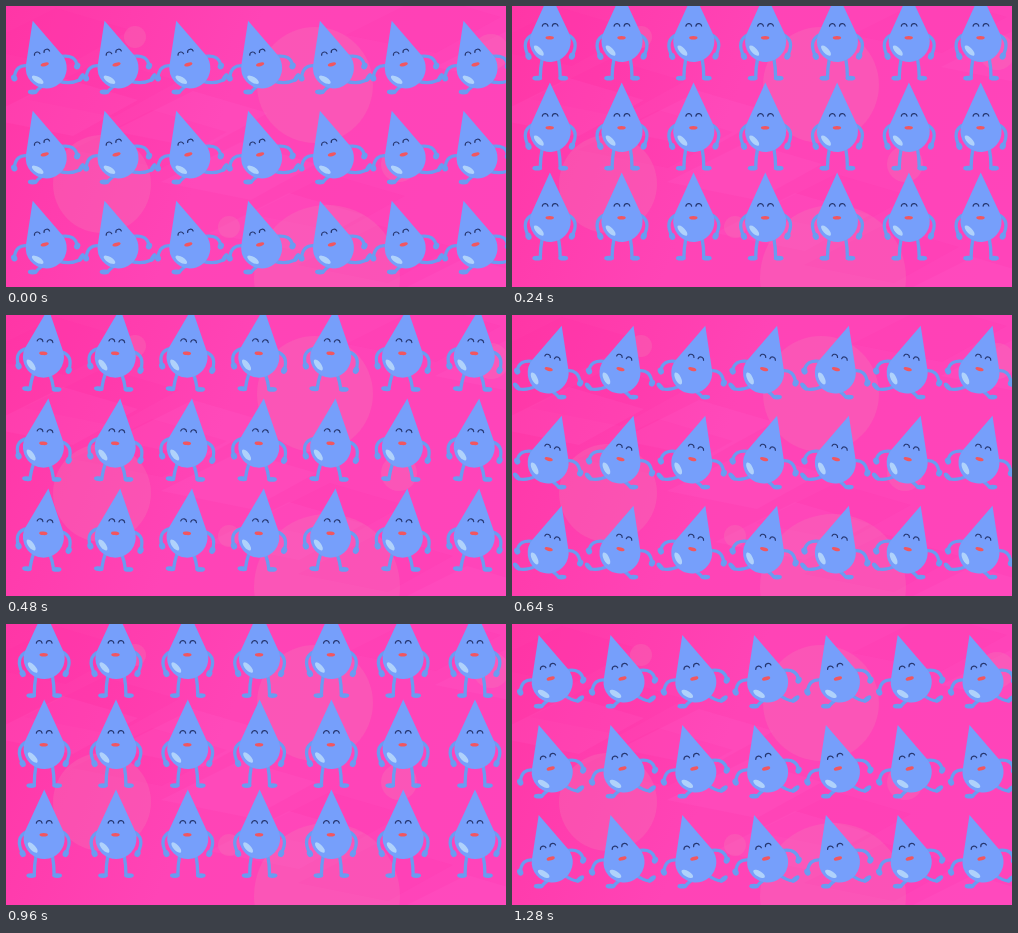
Recreate the animation shown at these times as an HTML page with a canvas. Size 500x281 px, loop 1.36 s.

```html
<!DOCTYPE html>
<html lang="en">
<head>
<meta charset="utf-8">
<title>Dancing drops</title>
<style>
  html, body { margin: 0; width: 100%; height: 100%; overflow: hidden; background: #ff41b2; }
  canvas { display: block; width: 500px; height: 281px; }
</style>
</head>
<body>
<canvas id="stage" width="500" height="281"></canvas>
<script>
const ctx = document.getElementById('stage').getContext('2d');
const LOOP = 1360, STEP = 80;
const BODY = '#769ffb', LIMB = '#6a9cf1';

const clamp = v => Math.max(0, Math.min(1, v));
const ease = v => v * v * (3 - 2 * v);

// How firmly the dancer is landed at point u (0..1) of a hop
const landed = u => ease(clamp((Math.abs(Math.cos(Math.PI * u)) - .4) / .5));

// The foot that stands at the start of a hop and kicks out at its end
function footAt(u) {
  const kick = clamp((u - .65) / .35);
  return { x: 10 + 24 * kick, y: 39 - 13 * landed(u) - 12 * kick * kick, kick };
}

// Two hops per loop: from left to right, then mirrored
function poseAt(time) {
  const hop = time / LOOP * 2, u = hop % 1;
  const dir = hop < 1 ? 1 : -1;
  const c = Math.cos(Math.PI * u);
  const start = footAt(u), end = footAt(1 - u);
  return {
    y: 32 + 26 * landed(u) + 2 * c,
    sway: -Math.sign(c) * landed(u) * dir,
    feet: dir > 0 ? [start, end] : [end, start]
  };
}

function dot(x, y, rx, ry, angle, color) {
  ctx.fillStyle = color;
  ctx.beginPath();
  ctx.ellipse(x, y, rx, ry, angle, 0, 7);
  ctx.fill();
}

function limb(x0, y0, cx, cy, x1, y1) {
  ctx.beginPath();
  ctx.moveTo(x0, y0);
  ctx.quadraticCurveTo(cx, cy, x1, y1);
  ctx.stroke();
}

// The arm on the side the drop leans away from swings up
function drawArm(side, sway, turn) {
  const raise = clamp(-sway * side), lower = clamp(sway * side);
  const x = side * (21.5 + 10 * (raise + lower));
  const y = 17 - 17 * raise - 5 * lower;
  limb(...turn(side * 17, -5), side * 30, 1 - 13 * raise - 3 * lower, x, y);
  dot(x, y, 3, 3.6, side * .4, LIMB);
}

function drawLeg(side, { x, y, kick }, turn) {
  const [hx, hy] = turn(side * 8, 18);
  const fx = side * x;
  limb(hx, hy, (hx + fx) / 2 + side, (hy + y) / 2 + kick * 4, fx, y);
  dot(fx + side * 3 * Math.cos(kick), y - 3 * Math.sin(kick), 4.8, 2.4, -side * kick, LIMB);
}

// A cone touching a circle, with the face on top
function drawBody() {
  const r = 20.5, cy = 2, tip = -47;
  const touch = Math.asin(r / (cy - tip));
  ctx.fillStyle = BODY;
  ctx.beginPath();
  ctx.moveTo(0, tip);
  ctx.arc(0, cy, r, -touch, Math.PI + touch);
  ctx.fill();
  dot(-11.5, 11, 2.8, 6.6, -.75, '#b0d2fb');
  ctx.strokeStyle = '#26366f';
  ctx.lineWidth = 1.2;
  for (const x of [-5, 5]) {
    ctx.beginPath();
    ctx.arc(x, -13, 2.9, Math.PI * 1.05, Math.PI * 1.95);
    ctx.stroke();
  }
  dot(-.5, -1.8, 4.2, 1.8, 0, '#f2565f');
}

function drawDrop(x, y, { sway, feet }) {
  const angle = sway * .28, c = Math.cos(angle), s = Math.sin(angle);
  const turn = (px, py) => [px * c - py * s, px * s + py * c];
  ctx.save();
  ctx.translate(x, y);
  ctx.strokeStyle = LIMB;
  ctx.lineWidth = 3.3;
  ctx.lineCap = 'round';
  [-1, 1].forEach((side, i) => {
    drawLeg(side, feet[i], turn);
    drawArm(side, sway, turn);
  });
  ctx.rotate(angle);
  drawBody();
  ctx.restore();
}

function drawPaper() {
  const pink = ctx.createLinearGradient(0, 0, 500, 200);
  pink.addColorStop(0, '#ff36a6');
  pink.addColorStop(.45, '#ff44b6');
  pink.addColorStop(1, '#ff44ba');
  ctx.fillStyle = pink;
  ctx.fillRect(0, 0, 500, 281);
  // soft paper creases
  for (let i = 0; i < 12; i++) {
    const x = (i * 137 + 40) % 500, y = (i * 83 + 30) % 281;
    ctx.fillStyle = i % 2 ? 'rgba(255,120,215,.1)' : 'rgba(255,30,155,.08)';
    ctx.beginPath();
    ctx.moveTo(x - 70, y + 12);
    ctx.lineTo(x + 10, y - 28);
    ctx.lineTo(x + 85, y - 6);
    ctx.lineTo(x + 20, y + 30);
    ctx.fill();
  }
  const spots = [[309, 79, 58], [96, 178, 49], [321, 272, 73], [393, 158, 18], [485, 46, 18], [223, 221, 11], [129, 31, 11]];
  for (const [x, y, r] of spots) dot(x, y, r, r, 0, 'rgba(240,130,180,.27)');
}

function frame() {
  const time = performance.now() % LOOP;
  const pose = poseAt(time - time % STEP);
  drawPaper();
  for (let row = 0; row < 3; row++)
    for (let col = 0; col < 7; col++)
      drawDrop(38.2 + col * 71.8 - pose.sway * 1.5, pose.y + row * 90, pose);
  requestAnimationFrame(frame);
}
frame();
</script>
</body>
</html>
```
